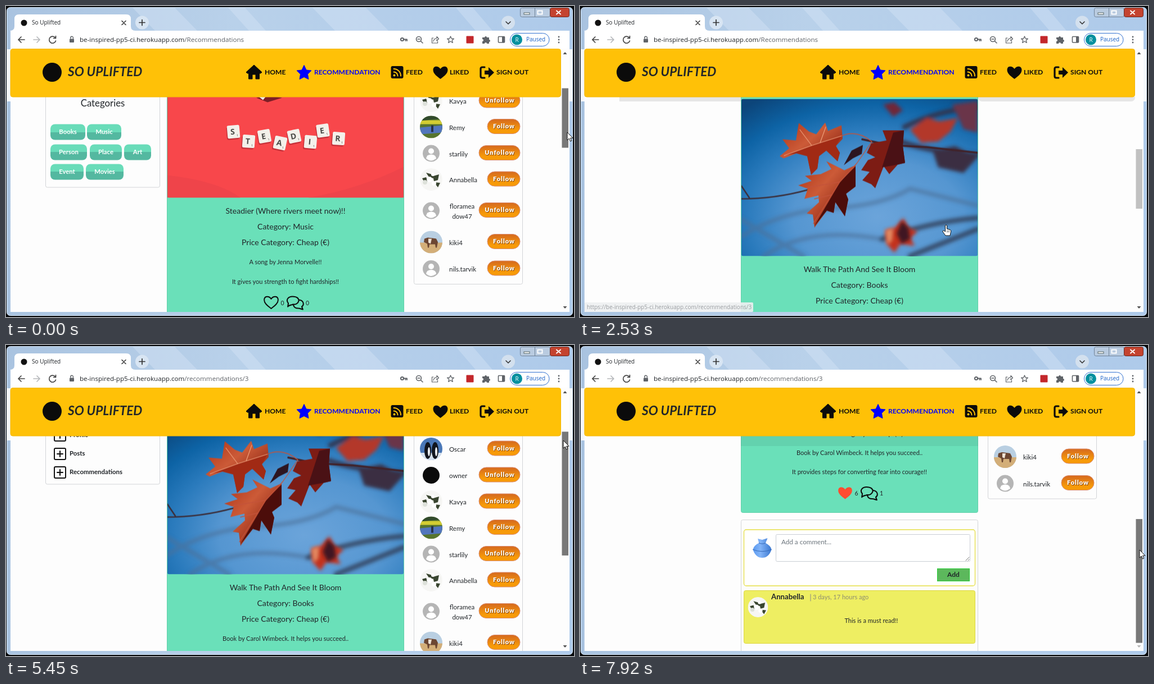
Animation, 1010 px wide and 554 px high, one loop 8 s. Source, as an HTML page:

```html
<!DOCTYPE html>
<html lang="en">
<head>
<meta charset="utf-8">
<title>So Uplifted</title>
<style>
  html, body { margin: 0; width: 100%; height: 100%; overflow: hidden; background: #05070a; }
  svg { display: block; }
  text { font-family: Lato, sans-serif; fill: #212529; white-space: pre; }
  .ui { font-family: "Open Sans", "Noto Sans", sans-serif; }
  .mid { text-anchor: middle; }
  .bold { font-weight: 700; }
  .white { fill: #fff; }
  .line { fill: none; stroke: #0b0b0b; stroke-linecap: round; stroke-linejoin: round; }
  .box { fill: #fdfdfd; stroke: #d3d5d8; }
</style>
</head>
<body>
<svg id="stage" width="100%" height="100%" viewBox="0 0 1010 554"></svg>
<script>
const LOOP = 8000, TEAL = '#6ae0b9', CARD_X = 286.5, CARD_W = 421;

// y is the visual middle of the line
const text = (x, y, s, size, cls = '', extra = '') =>
  `<text x="${x}" y="${y + size * .35}" font-size="${size}" class="${cls}" ${extra}>${s}</text>`;
const rect = (x, y, w, h, fill, r = 0, extra = '') =>
  `<rect x="${x}" y="${y}" width="${w}" height="${h}" rx="${r}" ${fill ? `fill="${fill}"` : ''} ${extra}/>`;
const circle = (x, y, r, fill, extra = '') => `<circle cx="${x}" cy="${y}" r="${r}" fill="${fill}" ${extra}/>`;
const path = (d, fill, extra = '') => `<path d="${d}" fill="${fill}" ${extra}/>`;
const line = (d, width, color = '#0b0b0b', extra = '') =>
  `<path d="${d}" class="line" stroke-width="${width}" style="stroke:${color}" ${extra}/>`;
const at = (x, y, content, extra = '') => `<g transform="translate(${x} ${y}) ${extra}">${content}</g>`;
const box = (x, y, w, h) => rect(x, y, w, h, '', 3, 'class="box"');

const HEART = 'M0 11C-5 7-13 2-13-5C-13-13-4-13 0-7C4-13 13-13 13-5C13 2 5 7 0 11Z';

const defs = `<defs>
  <clipPath id="view"><rect x="8" y="162" width="979" height="383"/></clipPath>
  <clipPath id="disc"><circle r="20"/></clipPath>
  <filter id="soft" x="-30%" y="-30%" width="160%" height="160%"><feGaussianBlur stdDeviation="3"/></filter>
  <linearGradient id="orange" x2="0" y2="1"><stop offset=".1" stop-color="#d96f1c"/><stop offset=".75" stop-color="#f79a08"/></linearGradient>
  <linearGradient id="green" x2="0" y2="1"><stop offset=".5" stop-color="#69dcb9"/><stop offset=".5" stop-color="#54b8a0"/></linearGradient>
  <linearGradient id="leaf" x2="1" y2="1"><stop offset=".1" stop-color="#b53c1e"/><stop offset=".4" stop-color="#cc5b38"/><stop offset=".9" stop-color="#7d180b"/></linearGradient>
  <linearGradient id="pot"><stop offset="0" stop-color="#5b9af0"/><stop offset=".4" stop-color="#82b4f8"/><stop offset="1" stop-color="#3b78d0"/></linearGradient>
  <radialGradient id="sky" cx=".58" cy=".75" r=".9"><stop offset="0" stop-color="#6ba4da"/><stop offset=".4" stop-color="#5596d1"/><stop offset=".62" stop-color="#2b7bbd"/><stop offset=".8" stop-color="#0d63a5"/><stop offset="1" stop-color="#0c457a"/></radialGradient>
  <linearGradient id="frame"><stop offset="0" stop-color="#a9c3e0"/><stop offset=".4" stop-color="#b9d1ea"/><stop offset="1" stop-color="#aecaea"/></linearGradient>
</defs>`;

// Pictures
const leafPhoto = y => `<svg x="287" y="${y}" width="420" height="280">
  ${rect(0, 0, 420, 280, 'url(#sky)', 3)}
  <g filter="url(#soft)">
    ${line('M0 245Q70 200 160 195T300 160L420 190M40 280Q120 225 250 250M0 215L110 280', 8, '#4c7099', 'opacity=".6"')}
    ${line('M250 250Q330 220 420 212M300 280L420 232', 9, '#33425f', 'opacity=".85"')}
    ${line('M265 70Q330 95 420 100M290 50Q350 20 420 15', 9, '#33304a', 'opacity=".9"')}
    ${path('M300 55L330 34L352 40L385 34L372 58L350 76L320 78Z', '#b3392c')}
    ${path('M375 10L420 4V60L395 54Z', '#6a3548')}
    ${path('M340 92L380 84L420 104L395 132L350 122Z', '#3a2f42')}
    ${path('M252 10L272 6L287 20L270 32Z', '#6f2637')}
  </g>
  ${line('M0 178Q60 178 118 162M0 155L14 176', 2.5, '#3b2f3b')}
  ${line('M215 72L262 82L330 86L420 96', 3.5, '#40232b')}
  ${path('M182 118L196 92L216 82L214 98L198 106Z', '#2d1520')}
  ${path('M251 56H289L287 84L291 114L278 117L263 134L253 120L238 159L231 152L215 145L228 130L213 127L225 109L238 104L223 96L231 79L258 74Z', '#7d1c14')}
  ${path('M270 60L289 56L287 84L291 114L278 117L250 122Z', '#4a1115')}
  ${path('M256 234L273 229L288 212L297 229L313 236L301 248L308 262L283 258L272 274L258 258Z', '#c3331f', 'filter="url(#soft)"')}
  ${path('M256 234L270 230L268 252L260 260Z', '#e28a62', 'filter="url(#soft)"')}
  ${path('M285 218L297 229L300 250L285 258L276 240Z', '#3f1820', 'filter="url(#soft)"')}
  ${path('M68 102L85 88L73 72L97 74L102 43L120 58L133 63L149 42L154 57L178 47L180 71L168 84L175 96L171 111L151 92L138 102L135 124L124 135L117 102L98 97L75 106Z', 'url(#leaf)')}
  ${path('M76 101L125 83L178 66L168 84L175 96L171 111L151 92L138 102L135 124L124 135L117 102L98 97Z', '#a12a14')}
  ${line('M76 101L125 83L178 66M125 83L104 55M140 78L150 50', 1.2, '#eea07c')}
  ${path('M203 118L183 127L151 111L160 125L141 134L113 137L125 146L101 154L118 160L112 178L137 172L138 184L116 204L127 206L130 229L152 199L164 203L167 184L184 209L190 179L186 169L203 156Z', 'url(#leaf)')}
  ${path('M203 120L176 147L130 226L152 199L164 203L167 184L184 209L190 179L186 169L203 156Z', '#4c0d0a')}
  ${line('M128 222L175 148L205 115L232 76Q205 54 178 66M175 148L116 158M160 171L130 178', 1.3, '#c4533a')}
</svg>`;

const TILES = [[404, 224, -5], [431, 241, 4], [459, 232, -10], [487, 244, 12], [512, 232, -12], [541, 242, 5], [563, 222, -8], [591, 236, 4]];
const tilePhoto = y => `<svg x="287" y="${y}" width="420" height="280">
  ${rect(0, 0, 420, 280, '#f8474b', 3)}
  ${path('M0 240Q90 250 130 280H0ZM250 280Q340 265 420 225V280Z', '#ef444a')}
  ${path('M158 102L180 98L204 102L178 110Z', '#7d1f27')}${path('M160 98L178 96L170 106Z', '#eee')}
  ${TILES.map(([x, ty, turn], i) => at(x - 287, ty - 61.5,
    rect(-12, -9, 22, 23, '#b42a35', 3, 'opacity=".7"') + rect(-10.5, -11.5, 22, 23, '#f3f0ea', 2.5) +
    text(-1, 0, 'STEADIER'[i], 14, 'ui mid bold', 'style="fill:#4b4b48"') +
    text(7, 7, 1, 5, 'ui mid'), `rotate(${turn})`)).join('')}
</svg>`;

const AVATARS = {
  blank: circle(0, 0, 15, '#b5b5b5') + circle(0, -4, 5, '#fff') + path('M-9 9Q-8 2 0 2T9 9Q0 17-9 9Z', '#fff'),
  flower: circle(0, 0, 20, '#f6f6f4') + path('M-9-12L2-9L7-2L-3-3ZM3-6L14-9L12 1L5 3ZM-16-2L-9-4L-6 3L-12 5ZM5 5L16 6L12 14Z', '#39452f') +
    circle(-3, 0, 5, '#fff') + circle(5, 7, 4, '#fff') + circle(3, -9, 3, '#fff') + circle(-11, 5, 4, '#dde1da'),
  park: rect(-20, -20, 40, 40, '#57752f') + rect(-20, -12, 40, 7, '#d3cd32') + path('M-20 1L20-3V10L-20 13Z', '#5276bd') + rect(0, -3, 4, 12, '#26324b') + path('M-20-20H20V-15L-20-11Z', '#324b2c'),
  goat: rect(-20, -20, 40, 40, '#b9cfe2') + rect(-20, 1, 40, 19, '#d3ae78') + path('M-12-6L-6-8L9-6L12 0L10 10H8L7 4L-3 4L-4 10H-6L-7 3L-13 0Z', '#6c4632') + path('M-5-6L1-6L-1 3L-5 1Z', '#eee2d4'),
  birds: rect(-20, -20, 40, 40, '#4a78b8') + rect(-20, 7, 40, 13, '#d6e2ef') + [-6, 7].map(x => `<ellipse cx="${x}" cy="3" rx="6" ry="15" fill="#11151e"/><ellipse cx="${x + 2}" cy="5" rx="2" ry="8" fill="#eef1f5"/>`).join(''),
  mark: circle(0, 0, 15, '#0b0b0b'),
  pot: path('M-8-17L0-15L10-18L6-9Q16-4 17 3Q12 18 0 18T-17 3Q-15-5-6-9Z', 'url(#pot)') + line('M-6-9Q0-6 6-9M-17 3Q0 10 17 3', 1, '#3469b7'),
};
const avatar = (kind, x, y, scale = 1) => at(x, y, `<g clip-path="url(#disc)">${AVATARS[kind]}</g>`, `scale(${scale})`);

// Page parts
const PROFILES = [
  ['Rowan', 'pot', 1, 271], ['Oscar', 'birds', 0, 318], ['owner', 'mark', 1, 365], ['Kavya', 'flower', 1, 412],
  ['Remy', 'park', 0, 458.5], ['starlily', 'blank', 1, 505.5], ['Annabella', 'flower', 0, 552],
  ['floramea dow47', 'blank', 1, 607.5], ['kiki4', 'goat', 0, 663.5], ['nils.tarvik', 'blank', 0, 711]];

function profileRow([name, kind, followed, y]) {
  const w = followed ? 73 : 58, label = followed ? 'Unfollow' : 'Follow', parts = name.split(' ');
  const button = (dx, color) => text(914.5 - w / 2 + dx, y - 1 + dx, label, 11, 'mid', `font-weight="900" letter-spacing="1" style="fill:${color}"`);
  return avatar(kind, 756, y) +
    (parts[1] ? text(811, y - 8, parts[0], 11.5, 'mid') + text(811, y + 10, parts[1], 11.5, 'mid') : text(788, y + 1, name, 11.5)) +
    rect(914 - w, y - 14, w, 26, 'url(#orange)', 13, 'stroke="#d88a72"') + button(.8, '#7a3c08') + button(0, '#fff');
}
const profiles = box(725.5, 182.5, 193, 556) + text(822, 216, 'Popular profiles', 15, 'mid') + PROFILES.map(profileRow).join('');

const menu = box(70.5, 182.5, 203, 198.5) + avatar('pot', 172, 232) +
  ['Profile', 'Posts', 'Recommendations'].map((label, i) => {
    const y = 294 + i * 33;
    return rect(86, y - 10, 20, 20, 'none', 2, 'stroke="#111" stroke-width="2"') +
      line(`M91 ${y}h10M96 ${y - 5}v10`, 2) + text(113, y - 1, label, 11.4, 'bold');
  }).join('');

const CATEGORIES = [['Books', 79, 62, 468], ['Music', 144, 61, 468], ['Person', 79, 65, 504], ['Place', 149, 57, 504],
  ['Art', 210, 48, 504], ['Event', 79, 59, 539], ['Movies', 142, 67, 539]];
const categories = box(70.5, 393.5, 203, 172.5) + text(172, 416, 'Categories', 16.8, 'mid') +
  CATEGORIES.map(([label, x, w, y]) => rect(x, y - 14.5, w, 28, 'url(#green)', 8) + text(x + w / 2, y - 1, label, 11.3, 'mid bold white')).join('');

const bubbles = line('M-4 3C-9 5-12 4-14 7L-13 1C-19-6-12-11-5-11C4-11 8-7 7-3C6 1 1 4-4 3ZM8-5C17-4 18 4 13 7L15 12C11 11 9 10 6 10C1 10-2 8-3 5', 2.2);

function post(bottom, photo, lines, likes, comments) {
  const row = (dy, i, size) => text(497, bottom + dy, lines[i], size, 'mid');
  return rect(CARD_X, bottom - 359.5, CARD_W, 581, TEAL, 3, 'stroke="#61d0aa"') + avatar('mark', 318, bottom - 319) +
    photo(bottom - 280) + row(23.5, 0, 14) + row(51.5, 1, 14) + row(80, 2, 14) + row(115, 3, 11) + row(149.5, 4, 11) +
    at(471.5, bottom + 187, likes ? path(HEART, '#ff4d31') : line(HEART, 2), 'scale(.95)') + text(491.5, bottom + 187.5, likes, 10.5, 'mid') +
    at(514, bottom + 187, bubbles, 'scale(.92 1)') + text(536, bottom + 187.5, comments, 10.5, 'mid');
}
const PRICE = 'Price Category: Cheap (€)';
const song = ['Steadier (Where rivers meet now)!!', 'Category: Music', PRICE, 'A song by Jenna Morvelle!!', 'It gives you strength to fight hardships!!'];
const book = ['Walk The Path And See It Bloom', 'Category: Books', PRICE, 'Book by Carol Wimbeck. It helps you succeed..', 'It provides steps for converting fear into courage!!'];

const thread = at(0, 464.5,
  box(CARD_X, 311.5, CARD_W, 240) + rect(291.5, 329, 411, 100, '#fff', 4, 'stroke="#e6df45" stroke-width="1.3"') +
  avatar('pot', 324, 361.5, .97) + rect(348.5, 337.5, 345, 48, '#fff', 2, 'stroke="#c9ced4"') +
  line('M686 384l6-6M690 384l2-2', 1, '#777') + text(358, 351, 'Add a comment...', 11.7, '', 'style="fill:#6c757d"') +
  rect(635.5, 398.5, 57, 22, '#5cb85c', 0, 'stroke="#27ce35"') + text(664, 408.5, 'Add', 12, 'mid bold') +
  rect(291.5, 437.5, 411, 94, '#eeee62', 3, 'stroke="#ddd63c"') + avatar('flower', 316.5, 467, .9) +
  text(340, 448, 'Annabella', 13.2, 'bold') + line('M410 444V456', 1, '#888') +
  text(414, 449.5, '3 days, 17 hours ago', 11, '', 'style="fill:#8d8d70"') + text(518, 491, 'This is a must read!!', 11, 'mid'));

const listPage = menu + categories + profiles + post(584.5, tilePhoto, song, 0, 0) + post(1177, leafPhoto, book, 6, 1);
const detailPage = menu + profiles + post(541.5, leafPhoto, book, 6, 1) + thread;

// Fixed chrome
const GREY = '#5f6368';
const browser = rect(1.5, 2.5, 1006, 549, 'url(#frame)', 6, 'stroke="#dcebfa"') +
  path('M225 3H300L340 44H265ZM395 3H425L462 44H432ZM545 3H640L680 44H585ZM800 3H830L865 44H835Z', '#d2e2f3', 'opacity=".45"') +
  rect(8, 44, 994, 501, '#fff') + rect(8, 162, 994, 383, '#fdfdfd') + path('M2 77h6v93h-6ZM1002 77h5v93h-5Z', '#f4f8fc') +
  path('M7 44Q15 44 15 36V23Q15 15 23 15H214Q222 15 222 23V36Q222 44 230 44Z', '#fff') +
  circle(32, 30, 5.5, '#111') + text(46, 29.5, 'So Uplifted', 10, 'ui') + line('M206 26.5l7 7m0-7l-7 7', 1.5, '#333') +
  circle(242, 29.5, 12, '#d8e5f3') + line('M237 29.5h10M242 24.5v10', 1.7, '#333') +
  circle(893, 29.5, 12, '#d3e0ee') + line('M889 28l4 4 4-4', 1.6, '#333') +
  rect(914.5, 3.5, 53, 16, '#b9cbe0', 3, 'stroke="#6f8298"') + rect(967.5, 3.5, 34, 16, '#c4432f', 3, 'stroke="#6d2a22"') +
  line('M940.5 4V19', 1, '#6f8298') + rect(921, 12, 10, 3, '#fff', 0, 'stroke="#566"') +
  rect(945.5, 8.5, 8, 6, 'none', 0, 'stroke="#fff" stroke-width="2"') + line('M979 8.5l7 6m0-6l-7 6', 2, '#fff') +
  line('M33 60H22M27 55L22 60L27 65', 1.7, '#444') + line('M49 60H60M55 55L60 60L55 65', 1.7, '#b6b8bb') +
  line('M87.5 56.5A6 6 0 1 0 88.5 62M88.5 53.5V57.5H84.5', 1.7, '#444') +
  rect(113, 58.5, 8, 6.5, GREY, 1) + line('M114.8 58V56.5a2.3 2.3 0 0 1 4.6 0V58', 1.4, GREY) +
  line('M706.5 59.5H713V62M710.5 60V62', 1.8, GREY) + circle(704.5, 59.5, 2.6, 'none', `stroke="${GREY}" stroke-width="2"`) +
  circle(734, 59, 4.5, 'none', `stroke="${GREY}" stroke-width="1.6"`) + line('M737.5 62.5L741 66M732 59h4', 1.6, GREY) +
  line('M760 57H757.5V66H767.5V63M760 63Q761 57.5 766 57.5V54.5L769.5 58.5L766 62V59.5', 1.2, GREY) +
  at(790.5, 60, line('M0-6L1.7-2L6-1.7L2.7 1.1L3.8 5.4L0 3L-3.8 5.4L-2.7 1.1L-6-1.7L-1.7-2Z', 1.3, GREY)) +
  rect(818.5, 53.5, 13, 13, '#c3272b', 1) +
  path('M847 56h4a2 2 0 0 1 4 0h4v4a2 2 0 0 1 0 4v3h-4a2 2 0 0 0-4 0h-4v-4a2 2 0 0 0 0-4Z', GREY) +
  rect(875.5, 54.5, 11, 10.5, 'none', 1, `stroke="${GREY}" stroke-width="1.6"`) + rect(882, 54.5, 4.5, 10.5, GREY) +
  rect(896.5, 48.5, 69.5, 23, '#fff', 11.5, 'stroke="#2f6fd0"') + circle(908.5, 60, 9.5, '#04909f') + text(908.5, 60, 'R', 10, 'ui mid white') +
  text(925, 59.5, 'Paused', 10, 'ui', 'style="fill:#1b62c8"') + [55, 60, 65].map(y => circle(983, y, 1.4, GREY)).join('') +
  text(131, 59.5, 'be-inspired-pp5-ci.herokuapp.com<tspan id="route" fill="#5f6368"></tspan>', 11.6, 'ui');

const navItem = (x, label, color = '#0b0b0b') => text(x, 118, label, 12.1, 'bold', `style="fill:${color}"`);
const navbar = rect(8, 76.5, 978.5, 85.5, '#ffc107', 4, 'stroke="#f3b70a"') + circle(82, 118, 17, '#0b0b0b') +
  text(110, 117.5, 'SO UPLIFTED', 22.6, 'bold', 'font-style="italic"') +
  at(441, 118, path('M0-13L14 0L12 2H9.5V12H3V4H-3V12H-9.5V2H-12L-14 0Z', '#0b0b0b', 'stroke="#0b0b0b" stroke-linejoin="round"')) + navItem(460, 'HOME') +
  at(530, 118.5, path('M0-13L4-4.5L13-3.5L6.5 3L8 12L0 8L-8 12L-6.5 3L-13-3.5L-4-4.5Z', '#00f', 'stroke="#00f" stroke-linejoin="round"')) + navItem(548, 'RECOMMENDATION', '#00f') +
  rect(684.5, 107, 22, 22, '#0b0b0b', 3) + circle(690.5, 123.5, 2, '#ffc107') + line('M689.5 117.5a7 7 0 0 1 7 7M689.5 112a12.5 12.5 0 0 1 12.5 12.5', 2, '#ffc107') + navItem(711, 'FEED') +
  at(772.5, 119, path(HEART, '#0b0b0b')) + navItem(789, 'LIKED') +
  line('M851 109H847Q844 109 844 112V125Q844 128 847 128H851', 3.2) + path('M851 115H858V109L868 118.5L858 128V122H851Z', '#0b0b0b') + navItem(872, 'SIGN OUT');

const scrollbar = rect(987, 76, 15, 469, '#fdfdfd') + path('M990.5 86l3.5-4 3.5 4Z', '#505050') +
  path('M990.5 535l3.5 4 3.5-4Z', '#505050', 'id="down"') + rect(988.5, 0, 11.5, 106, '#787878', 0, 'id="thumb"');

const status = `<g id="status">${rect(8, 528, 300, 17, '#eef0f1', 2, 'opacity=".9"')}${
  text(12, 536.5, 'https://be-inspired-pp5-ci.herokuapp.com/recommendations/3', 10, 'ui', 'style="fill:#9a9da1"')}</g>`;

const pointers = `<g id="arrow">${path('M0 0V14L3.3 11L5.5 16L7.8 15L5.6 10.2H10Z', '#fff', 'stroke="#111"')}</g>
  <g id="hand">${path('M-1.5 1Q0-1 1.5 1V7L7 8.5Q9 9 8.5 12L7 19H-1L-6 12Q-6 9-3.5 10.5L-1.5 12Z', '#fff', 'stroke="#111"')}${line('M2 10v3M5 10v3', .8)}</g>`;

document.getElementById('stage').innerHTML = defs + browser +
  `<g clip-path="url(#view)"><g id="shade">${rect(70, 162, 216, 8, '#e6e6e6')}<g id="shadeRight">${rect(708, 154, 279, 16, '#e6e6e6', 7)}</g></g>
   <g id="list">${listPage}</g><g id="detail">${detailPage}</g>${rect(286, 162, 422, 18, '#000', 0, 'id="cardShade" opacity=".06"')}</g>` +
  navbar + scrollbar + status + pointers;

// [from ms, to ms, steps, scroll, pointer x, pointer y]
const MOVES = [
  [0, 0, 1, 243, 998, 225],
  [240, 440, 4, 430, 1003, 266], [750, 1010, 5, 640, 1006, 312],
  [1470, 1590, 3, 801, 1008, 348], [1670, 1750, 2, 846, 1009, 358], [1820, 2030, 4, 731.5, 1000, 338],
  [2200, 2530, 5, 731.5, 651, 390], [2610, 2610, 1, 464.5, 651, 390],
  [3040, 3420, 6, 464.5, 898, 284], [3620, 3830, 5, 464.5, 973, 286], [3880, 4100, 4, 464.5, 990, 336],
  [4500, 4740, 5, 335, 990, 274], [4960, 5230, 5, 140, 990, 174], [5450, 5450, 1, 133, 991, 170],
  [5510, 5680, 4, 32, 991, 123], [5990, 6130, 3, 0, 991, 100], [6340, 6540, 4, 249, 993, 230],
  [6790, 6980, 4, 350, 994, 280], [7340, 7920, 10, 464.5, 995, 365]];

function stateAt(t) {
  let now = [0, 0, 0];
  for (const [from, to, steps, ...goal] of MOVES) {
    if (t < from) break;
    const step = Math.floor((t - from) / (to - from || 1) * (steps - 1) + 1e-6) + 1;
    const k = Math.min(step, steps) / steps;
    now = now.map((v, i) => v + (goal[i] - v) * k);
  }
  return now;
}

const el = id => document.getElementById(id);
const show = (id, on) => el(id).setAttribute('display', on ? 'inline' : 'none');
const move = (id, x, y) => el(id).setAttribute('transform', `translate(${x} ${y})`);

function draw() {
  const t = performance.now() % LOOP, [scroll, x, y] = stateAt(t);
  const detail = t >= 2610, onLink = t >= 2370 && t < 3040;
  show('list', !detail);
  show('detail', detail);
  move(detail ? 'detail' : 'list', 0, -scroll);
  show('shade', !detail && scroll > 404);
  show('shadeRight', !detail && t > 2030);
  show('cardShade', t >= 3040 && scroll > 464);
  show('status', onLink);
  show('arrow', !onLink);
  show('hand', onLink);
  move(onLink ? 'hand' : 'arrow', x, y);
  el('route').textContent = detail ? '/recommendations/3' : '/Recommendations';
  const thumb = el('thumb');
  thumb.setAttribute('y', detail ? 92 + scroll / 2.13 : 92.5 + scroll / 4.5);
  thumb.setAttribute('height', detail ? 220.5 : 106);
  thumb.setAttribute('fill', t < 2100 || t >= 4500 ? '#787878' : t >= 4050 ? '#a8a8a8' : '#c1c1c1');
  el('down').setAttribute('fill', detail && scroll > 464 ? '#b5b5b5' : '#505050');
  requestAnimationFrame(draw);
}
draw();
</script>
</body>
</html>
```
